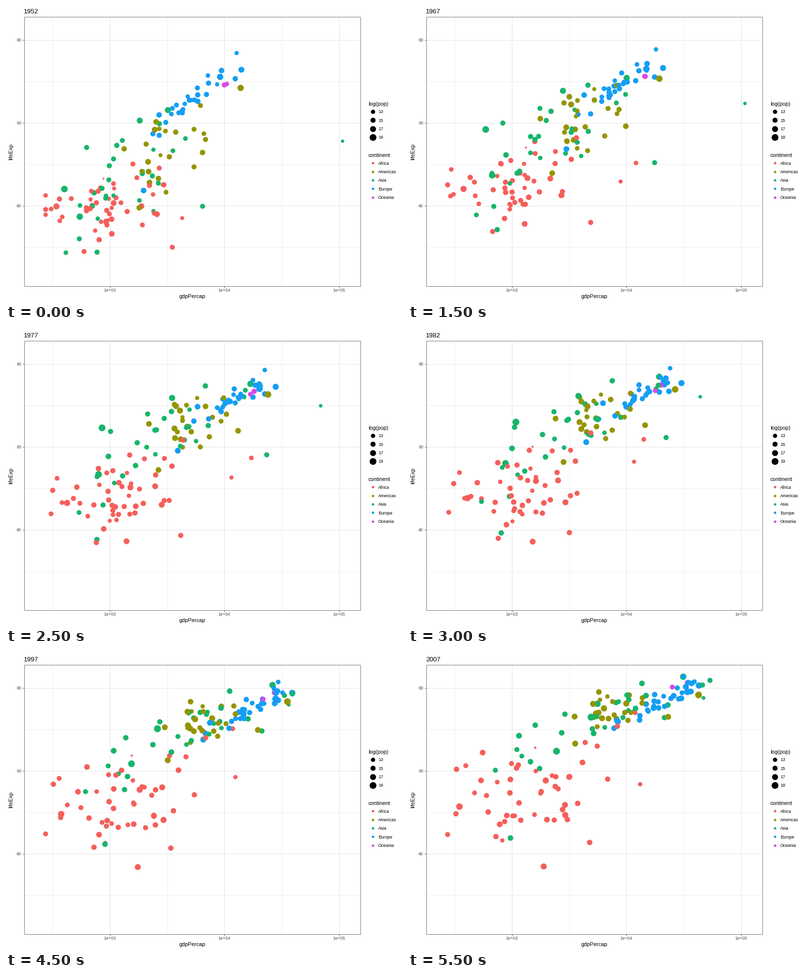
Animation of 800x600 px, one loop 6 s. Source, as a matplotlib script:

```python
import numpy as np
import matplotlib.pyplot as plt
from matplotlib.animation import FuncAnimation
from matplotlib.patches import Rectangle

W, H, DPI = 800, 600, 100
PT = 72 / DPI
YEARS = range(1952, 2008, 5)
N = len(YEARS)
STEPS = np.arange(N)
COLORS = {"Africa": "#f55f5b", "Americas": "#959400", "Asia": "#17b56b",
          "Europe": "#159ef3", "Oceania": "#d74ae8"}
rng = np.random.default_rng(7)

# Per continent: point count, then (x, y, x spread, y spread, correlation)
# in stage pixels at the first, middle and last step.
CLOUD_STEPS = [0, 5, 11]
CLOUDS = {
    "Africa": (48, (195, 408, 64, 36, -.3), (225, 335, 62, 45, -.4), (240, 285, 80, 58, -.4)),
    "Americas": (24, (325, 295, 45, 62, -.6), (375, 190, 45, 42, -.5), (412, 115, 45, 26, -.5)),
    "Asia": (27, (235, 350, 62, 62, -.5), (310, 220, 82, 60, -.75), (385, 132, 108, 46, -.85)),
    "Europe": (29, (378, 188, 47, 33, -.9), (465, 138, 40, 19, -.7), (520, 92, 44, 23, -.85)),
}

# Points that leave their cloud: radius, then waypoints.
PATH_STEPS = [0, 4, 7, 11]
PATHS = [
    ("Africa", 4.5, (297, 382), (515, 297), (457, 184), (459, 119)),
    ("Africa", 4, (356, 430), (454, 331), (458, 235), (469, 264)),
    ("Africa", 5.1, (336, 489), (380, 422), (299, 405), (367, 382)),
    ("Africa", 1.9, (197, 350), (252, 266), (251, 222), (257, 190)),
    ("Americas", 6.4, (474, 166), (519, 141), (550, 110), (587, 83)),
    ("Asia", 3.4, (680, 274), (681, 172), (545, 117), (597, 89)),
    ("Asia", 5, (397, 406), (532, 288), (516, 183), (518, 129)),
    ("Asia", 6.7, (118, 371), (170, 210), (242, 175), (370, 128)),
    ("Asia", 6.5, (149, 427), (177, 315), (207, 248), (300, 197)),
    ("Asia", 6.1, (327, 211), (480, 124), (521, 80), (556, 46)),
    ("Asia", 5.2, (184, 499), (179, 438), (193, 398), (207, 373)),
    ("Europe", 5.7, (278, 374), (334, 262), (373, 210), (424, 137)),
    ("Oceania", 5.2, (441, 160), (492, 137), (520, 99), (565, 58)),
    ("Oceania", 4.6, (446, 158), (488, 137), (505, 116), (534, 67)),
]

tracks, radii, colors = [], [], []


def add(continent, radius, track):
    tracks.append(track)
    radii.append(radius + 0.04 * STEPS)
    colors.append(COLORS[continent])


def blend(keys, values):
    return [np.interp(STEPS, keys, column) for column in zip(*values)]


def scores(count):
    """Bounded normal scores with zero mean and unit spread."""
    z = rng.normal(size=(count, 2)).clip(-2, 2)
    return (z - z.mean(axis=0)) / z.std(axis=0)


def add_cloud(continent, count, *stats):
    """Each point keeps its place in the cloud, apart from a slow wander."""
    cx, cy, sx, sy, rho = blend(CLOUD_STEPS, stats)
    turn = 0.7 * STEPS / N
    for a, b in zip(scores(count), scores(count)):
        u, v = (np.cos(turn) * p + np.sin(turn) * q for p, q in zip(a, b))
        x = cx + sx * u
        y = cy + sy * (rho * u + np.sqrt(1 - rho ** 2) * v)
        jitter = rng.normal(0, 1.5, (N, 2))
        track = np.column_stack([x, y]) + jitter
        add(continent, rng.normal(5, 0.45), track.clip((80, 46), (610, 500)))


for name, cloud in CLOUDS.items():
    add_cloud(name, *cloud)
for name, radius, *stops in PATHS:
    add(name, radius, np.column_stack(blend(PATH_STEPS, stops)))

order = rng.permutation(len(tracks))
tracks = np.array(tracks)[order]
radii = np.array(radii)[order]
colors = [colors[i] for i in order]

plt.rcParams["font.family"] = "Liberation Sans"
fig = plt.figure(figsize=(W / DPI, H / DPI), dpi=DPI, facecolor="white")
ax = fig.add_axes([0, 0, 1, 1])
ax.set(xlim=(0, W), ylim=(H, 0))
ax.axis("off")


def label(x, y, text, size=8.8, color="black", **kw):
    return ax.text(x, y, text, fontsize=size * PT, color=color, **kw)


def line(x, y, color, z=1):
    ax.plot(x, y, color=color, lw=PT, zorder=z, solid_capstyle="butt")


def area(radius):
    return (2 * radius * PT) ** 2


LEFT, RIGHT, TOP, BOTTOM = 36.5, 715.5, 21.5, 567.5
MINOR, MAJOR, TICK, GREY = "#eeeeee", "#e3e3e3", "#444444", "#4d4d4d"
for k in range(3):
    x, y = 209.5 + 231.5 * k, 68.5 + 168 * k
    line([x - 115.5] * 2, [TOP, BOTTOM], MINOR)
    line([LEFT, RIGHT], [y + 84] * 2, MINOR)
    line([x, x], [TOP, BOTTOM], MAJOR, 2)
    line([LEFT, RIGHT], [y, y], MAJOR, 2)
    line([x, x], [BOTTOM, BOTTOM + 3], TICK)
    line([LEFT - 3, LEFT], [y, y], TICK)
    label(x, 579, f"1e+0{3 + k}", color=GREY, ha="center")
    label(31, y + 3.3, str(80 - 20 * k), color=GREY, ha="right")
ax.add_patch(Rectangle((LEFT, TOP), RIGHT - LEFT, BOTTOM - TOP, fill=False,
                       ec="#7c7c7c", lw=PT, zorder=4))

label(376, 592, "gdpPercap", 11, ha="center")
label(10, 295, "lifeExp", 11, rotation=90, ha="center", va="center")
title = label(36, 15, "", 13.2)


def legend(y, heading, entries):
    label(732, y - 12, heading, 11)
    for text, radius, color in entries:
        ax.scatter(741.3, y, s=area(radius), color=color, lw=0)
        label(752, y + 3.4, text)
        y += 17.35


legend(214, "log(pop)", [(str(13 + 2 * k), 4.3 + 0.85 * k, "black") for k in range(4)])
legend(318.3, "continent", [(name, 2.5, color) for name, color in COLORS.items()])

dots = ax.scatter(*tracks[:, 0].T, s=area(radii[:, 0]), c=colors, lw=0, zorder=3)


def update(i):
    title.set_text(str(YEARS[i]))
    dots.set_offsets(tracks[:, i])
    dots.set_sizes(area(radii[:, i]))
    return title, dots


anim = FuncAnimation(fig, update, frames=N, interval=500, repeat=True)
plt.show()
```
